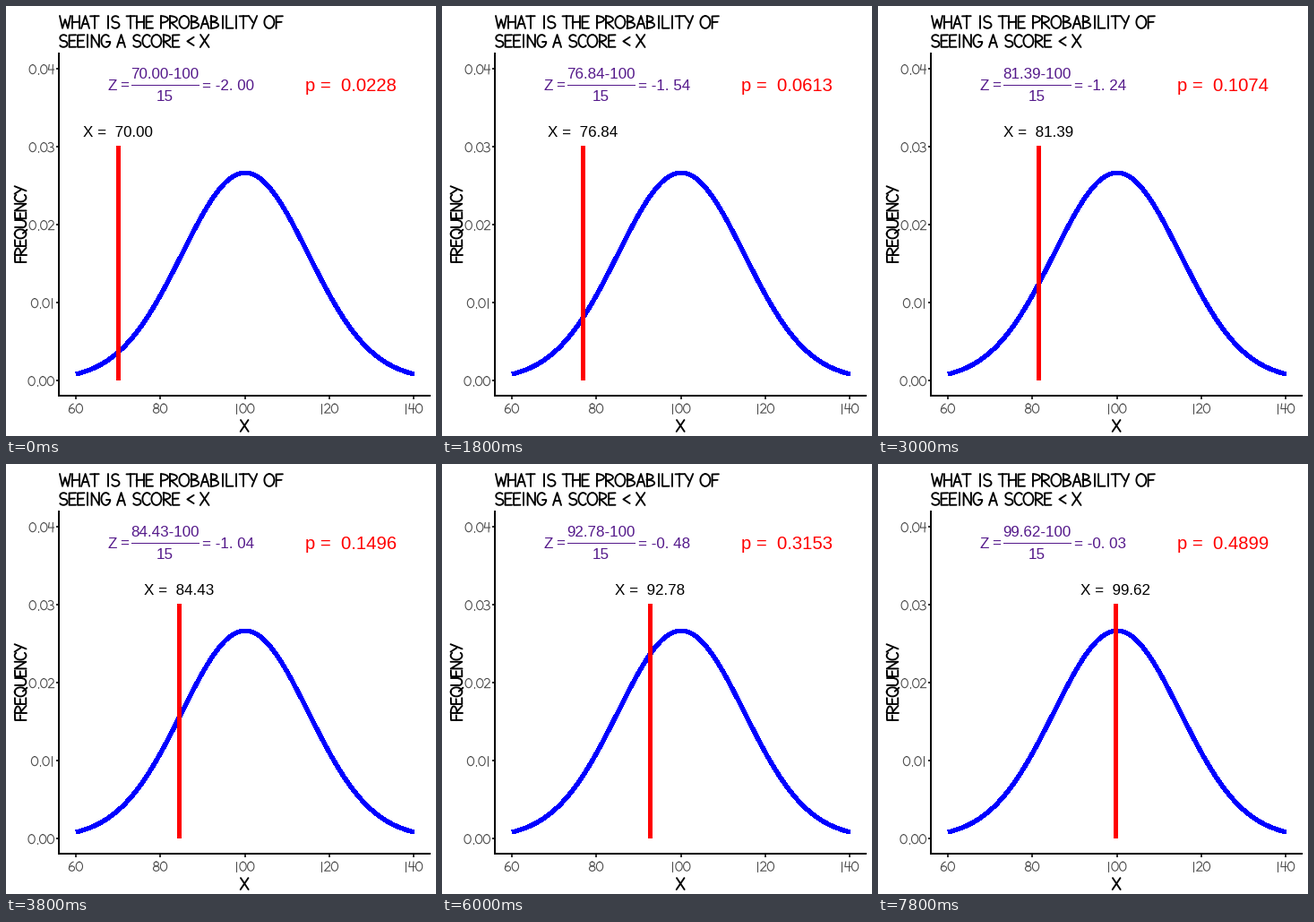
Animation of 480 by 480 pixels, one loop 8 s. Source, as a matplotlib script:

```python
import math

import numpy as np
import matplotlib.pyplot as plt
from matplotlib.animation import FuncAnimation
from matplotlib.collections import LineCollection

SIZE, FRAMES, STEP = 480, 40, 200
MEAN, SD = 100, 15
PURPLE = "#551A8B"
plt.rcParams["font.family"] = "Liberation Sans"


def line(*p):
    return np.array(p, float).reshape(-1, 2)


def arc(cx, cy, rx, ry, start=90, end=450):
    a = np.radians(np.linspace(start, end, 40))
    return np.column_stack([cx + rx * np.cos(a), cy + ry * np.sin(a)])


# Hand-lettered strokes: (advance, strokes), capital height 14
STRAIGHT = {
    "A": (10.5, [line(0, 0, 4.6, 14, 9, 0), line(1.6, 4.8, 7.6, 5)]),
    "E": (9.5, [line(8, 13.7, .6, 13.5, .6, .2, 8, .3), line(.6, 7.2, 6.8, 7.4)]),
    "F": (9, [line(7.9, 13.7, .6, 13.5, .6, 0), line(.6, 7, 6.6, 7.2)]),
    "H": (11, [line(.6, 14, .6, 0), line(9, 14, 9, 0), line(.6, 7, 9, 7.3)]),
    "I": (6, [line(2, 14, 2, 0)]),
    "L": (9.5, [line(.6, 14, .6, .2, 8, .3)]),
    "N": (11, [line(.6, 0, .6, 13.8, 8.9, .2, 8.9, 14)]),
    "T": (10, [line(-.5, 13.6, 9.2, 13.8), line(4.3, 13.7, 4.3, 0)]),
    "W": (13, [line(0, 14, 3, .2, 6, 10, 9, .2, 12, 14)]),
    "X": (11, [line(.3, 0, 9.8, 14), line(.6, 14, 10, 0)]),
    "Y": (10, [line(0, 14, 4.7, 6.8), line(9.2, 14, 3.6, 0)]),
    "<": (7.5, [line(7.6, 11.2, .4, 6.6, 7.6, 2)]),
    " ": (7, []),
}
STEM = line(.6, 14, .6, 0)
ROUND = {
    "B": (11.5, [STEM, arc(.6, 10.6, 7, 3.2, 90, -90), arc(.6, 3.7, 8.6, 3.6, 90, -90)]),
    "C": (10, [arc(5.4, 7, 5, 6.9, 48, 312)]),
    "G": (11, [arc(5.4, 7, 5, 6.9, 48, 350), line(5.6, 5.8, 10.3, 5.8)]),
    "O": (13, [arc(5.9, 7, 5.5, 6.9)]),
    "P": (10, [STEM, arc(.6, 10.1, 7.8, 3.7, 90, -90)]),
    "Q": (13, [arc(5.9, 7, 5.5, 6.9), line(6.6, 4, 11, -1)]),
    "R": (10.5, [STEM, arc(.6, 10.1, 7.8, 3.7, 90, -90), line(2, 6.4, 9, 0)]),
    "S": (10.5, [arc(4.8, 10.4, 4, 3.4, 40, 270), arc(4.6, 3.6, 4.4, 3.4, 90, -150)]),
    "U": (11, [line(.6, 14, .6, 4.5), arc(4.9, 4.5, 4.3, 4.3, 180, 360),
               line(9.2, 4.5, 9.2, 14)]),
}
DIGITS = {
    "0": (11.5, [arc(5.4, 7, 4.8, 6.6)]),
    "1": (7, [line(3, 14, 3, 0)]),
    "2": (10, [arc(4.4, 10, 3.8, 3.9, 160, -35), line(7.5, 7.8, .5, .4, 9, .4)]),
    "3": (10, [arc(3.8, 10.5, 3.8, 3.3, 145, -90), arc(3.8, 3.7, 4.6, 3.5, 90, -150)]),
    "4": (10, [line(1.8, 14, .6, 6.4, 9, 6.6), line(7.2, 14, 6.8, 0)]),
    "6": (10.5, [arc(4.9, 3.9, 4, 3.6), arc(8.6, 4, 7.7, 9.8, 180, 100)]),
    "8": (10.5, [arc(4.9, 10.6, 3.4, 3.2), arc(4.9, 3.8, 4.2, 3.6)]),
    ".": (5, [line(1.8, .1, 1.8, .9)]),
}
GLYPHS = {**STRAIGHT, **ROUND, **DIGITS}


def hand(text, x, y, scale=1.0, lw=1.9, color="black", align=0.0, upright=False):
    width = sum(GLYPHS[c][0] for c in text) * scale
    pen, strokes = -align * width, []
    for c in text:
        advance, parts = GLYPHS[c]
        for part in parts:
            along, up = pen + part[:, 0] * scale, part[:, 1] * scale
            px, py = (x - up, y - along) if upright else (x + along, y - up)
            strokes.append(np.column_stack([px, py]))
        pen += advance * scale
    ax.add_collection(LineCollection(strokes, colors=color, linewidths=lw,
                                     capstyle="round", joinstyle="round"))


def tick_label(text, x, y, align):
    hand(text, x, y, .76, 1.1, "#4D4D4D", align)


def px(score):
    return 266.5 + (score - MEAN) * 4.71


def py(density):
    return 418 - density * 8700


def rule(xs, ys, lw, color, z=2):
    return ax.plot(xs, ys, color=color, lw=lw, zorder=z, antialiased=False,
                   solid_capstyle="butt")[0]


def label(x, y, size, color, text="", ha="left"):
    return ax.text(x, y, text, size=size, color=color, ha=ha, va="baseline", zorder=5)


fig = plt.figure(figsize=(SIZE / 72, SIZE / 72), dpi=72, facecolor="white")
ax = fig.add_axes([0, 0, 1, 1])
ax.set_xlim(0, SIZE)
ax.set_ylim(SIZE, 0)
ax.axis("off")

hand("WHAT IS THE PROBABILITY OF", 60, 25)
hand("SEEING A SCORE < X", 59.5, 46)
hand("FREQUENCY", 22.5, 286.5, .92, upright=True)
hand("X", 266.5, 475, .92, align=.5)

# Axes and ticks
rule([59, 59], [52, 436], 2, "black")
rule([58, 474], [435, 435], 2, "black")
for score in range(60, 141, 20):
    rule([px(score)] * 2, [436, 439], 2, "#333333")
    tick_label(str(score), px(score), 454.5, .5)
for k in range(5):
    y = py(k / 100)
    rule([56, 58], [y, y], 2, "#333333")
    tick_label(f"{k / 100:.2f}", 54.5, y + 6, 1)

scores = np.linspace(60, 140, 200)
bell = np.exp(-((scores - MEAN) / SD) ** 2 / 2) / (SD * math.sqrt(2 * math.pi))
rule(px(scores) + .4, py(bell) - .5, 4.2, "#0000FF", 3)
marker = rule([0, 0], [156, 417], 5, "#FF0000", 4)

# Formula
label(113.5, 94, 17, PURPLE, "Z")
label(127, 94, 17, PURPLE, "=")
label(177.5, 106, 17, PURPLE, "15", "center")
rule([140, 215], [88, 88], 1, PURPLE)
top = label(177.5, 81, 17, PURPLE, ha="center")
z_text = label(219, 94, 17, PURPLE)
p_text = label(333.5, 95, 20.2, "#FF0000")
x_text = label(0, 146, 17, "black", ha="center")


def draw(i):
    x = 70 + 60 * i / 79
    z = (x - MEAN) / SD
    p = (1 + math.erf(z / math.sqrt(2))) / 2
    marker.set_xdata([px(x) - .15] * 2)
    x_text.set_x(px(x))
    x_text.set_text(f"X =  {x:.2f}")
    top.set_text(f"{x:.2f}-{MEAN}")
    z_text.set_text(f"= {z:.2f}".replace(".", ". "))
    p_text.set_text(f"p =  {p:.4f}")
    return marker, x_text, top, z_text, p_text


anim = FuncAnimation(fig, draw, frames=FRAMES, interval=STEP, repeat=True,
                     repeat_delay=0, init_func=lambda: draw(0))
plt.show()
```
